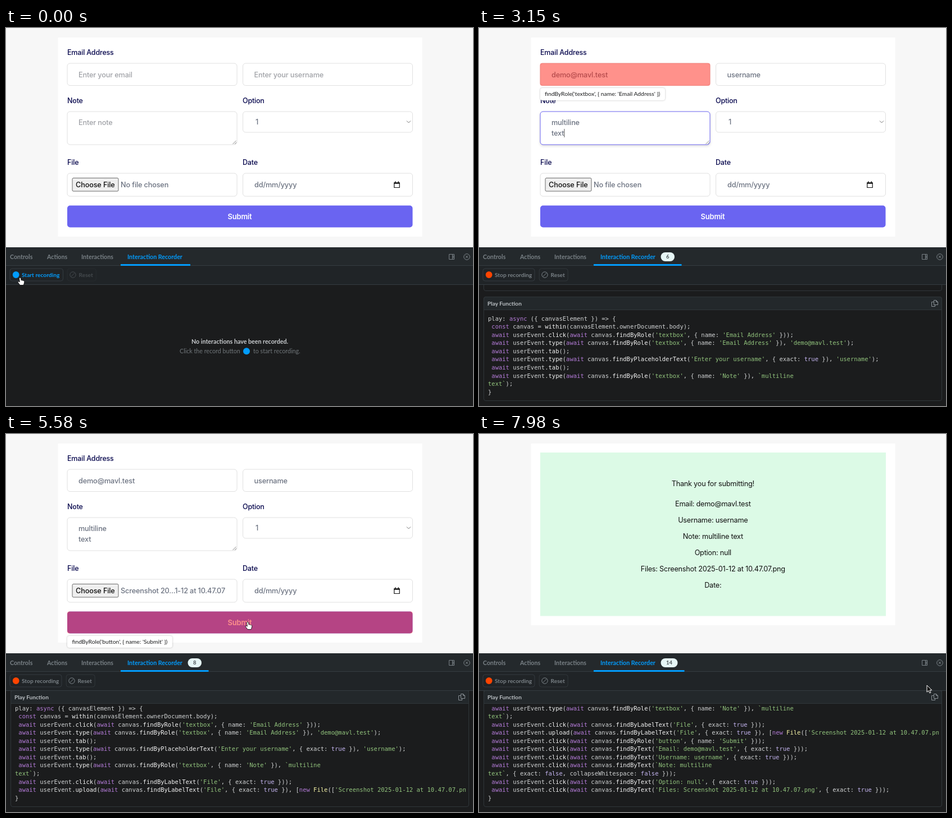
These frames come from a looping animation (831 px wide and 674 px high, 8 s). An HTML page:

```html
<!DOCTYPE html>
<html lang="en">
<head>
<meta charset="utf-8">
<title>Interaction Recorder</title>
<style>
html, body { margin: 0; width: 100%; height: 100%; overflow: hidden; background: #1b1c1d; }
#stage { position: absolute; left: 0; top: 0; width: 831px; height: 674px; overflow: hidden; }
#stage > svg { position: absolute; left: 0; top: 0; }
svg text, #tip { white-space: pre; }
.form { font: 500 12.7px Inter, "Liberation Sans", sans-serif; letter-spacing: -.15px; fill: #6b7280; }
.label { fill: #07074d; font-size: 12.5px; letter-spacing: -.18px; }
.hint { fill: #a0a2a7; }
.field { fill: #fff; stroke: #e0e0e0; }
.focus { stroke: #6a64f1; filter: drop-shadow(0 2px 2px rgba(0,0,0,.14)); }
.thanks { font: 400 12.7px Inter, "Liberation Sans", sans-serif; letter-spacing: -.24px; text-anchor: middle; fill: #111; }
.ui { font: 700 10.7px Lato, "Open Sans", sans-serif; fill: #798186; }
.ui .btn { font-size: 10.2px; }
.mid { text-anchor: middle; }
.thin { font-weight: 400; fill: #70767a; }
.line { fill: none; stroke: #798186; }
#panel { position: absolute; left: 0; top: 458px; width: 831px; height: 216px; overflow: hidden; background: #1b1c1d; }
.box, .head { position: absolute; left: 8px; width: 816px; box-sizing: border-box; border: 1px solid #30363a; border-radius: 4px; }
.head { height: 24px; background: #23282b; font: 700 10.1px/22px Lato, "Open Sans", sans-serif; color: #b9bec2; padding-left: 6px; border-radius: 4px 4px 0 0; }
.head svg { position: absolute; right: 5px; top: 4px; }
pre { position: absolute; left: 16px; width: 802px; margin: 0; overflow: hidden; font: 10.51px/14.55px "DejaVu Sans Mono", "Liberation Mono", monospace; color: #d0d2d3; }
pre .s { color: #92c47d; } pre .k { color: #b47bd8; } pre .b { color: #c6b6f2; } pre .c { color: #f6f3a6; } pre .f { color: #f2f2f2; }
#tip { position: absolute; box-sizing: border-box; height: 21.5px; padding: 0 8.5px; border-radius: 4px; background: #fff; color: #1b1c1d; font: 400 10.3px/21px Lato, "Open Sans", sans-serif; box-shadow: 0 0 3px rgba(0,0,0,.28); }
.dlg { font: 400 11px Inter, "Liberation Sans", sans-serif; fill: #dedede; letter-spacing: -.1px; }
.bold { font-weight: 600; }
.pill { fill: #727272; }
.rule { stroke: #4a4a4a; fill: none; }
</style>
</head>
<body>
<div id="stage">
<svg width="831" height="674" viewBox="0 0 831 674">
  <rect width="831" height="391" fill="#f7f7f7"/>
  <rect id="card" x="92.5" y="17" width="648" height="355" fill="#fff"/>
  <g id="form" class="form">
    <text class="label" x="109" y="47.6">Email Address</text>
    <text class="label" x="109" y="133.5">Note</text>
    <text class="label" x="421" y="133.5">Option</text>
    <text class="label" x="109" y="243.5">File</text>
    <text class="label" x="421" y="243.5">Date</text>
    <rect id="emailBox" class="field" x="109" y="63" width="302" height="39.5" rx="5"/>
    <rect id="userBox" class="field" x="421.5" y="63" width="302" height="39.5" rx="5"/>
    <rect id="noteBox" class="field" x="109" y="149" width="302" height="59" rx="5"/>
    <rect class="field" x="421.5" y="149" width="302" height="37" rx="5"/>
    <rect class="field" x="109" y="259" width="302" height="41" rx="5"/>
    <rect class="field" x="421.5" y="259" width="302" height="41" rx="5"/>
    <text id="email" x="129" y="87.5"></text>
    <text id="user" x="441.5" y="87.5"></text>
    <text id="note" x="129" y="173"></text>
    <text id="note2" x="129" y="192.4"></text>
    <path id="caret" d="M0 0v15" stroke="#555"/>
    <path d="M403.5 207l6-6m-2.500 6l3-3" stroke="#777" stroke-width=".9"/>
    <text x="444" y="172">1</text>
    <path d="M713 165.500l3.500 3.500 3.500-3.500" fill="none" stroke="#777"/>
    <rect x="118" y="267.5" width="82" height="23.500" rx="2" fill="#efefef" stroke="#6a6a6a"/>
    <text x="124" y="284" style="fill:#111">Choose File</text>
    <text id="file" x="204" y="284"></text>
    <text x="442" y="284">dd/mm/yyyy</text>
    <path d="M690.800 275.800h9.400v8.700h-9.400z" fill="none" stroke="#111" stroke-width="1.200"/>
    <path d="M690.500 276.800h10M692.800 273.500v2m5.400-2v2" stroke="#111" stroke-width="1.700"/>
    <rect x="109" y="316.500" width="614.500" height="39" rx="5" fill="#6a64f1"/>
    <text class="mid" x="416" y="340.500" style="fill:#fff;font-weight:600;font-size:12.9px">Submit</text>
  </g>
  <g id="done" class="thanks">
    <rect x="109" y="33" width="615" height="291.500" fill="#dcfae6"/>
    <text x="416.300" y="93">Thank you for submitting!</text>
    <text x="416.300" y="128.700">Email: demo@mavl.test</text>
    <text x="416.300" y="157.800">Username: username</text>
    <text x="416.300" y="187">Note: multiline text</text>
    <text x="416.300" y="216">Option: null</text>
    <text x="416.300" y="245.200">Files: Screenshot 2025-01-12 at 10.47.07.png</text>
    <text x="416.300" y="274.300">Date:</text>
  </g>
  <rect id="glow" rx="4" fill="rgba(255,36,24,.5)"/>

  <g class="ui">
    <rect y="391" width="831" height="283" fill="#1b1c1d"/>
    <rect y="391" width="831" height="33" fill="#24292c"/>
    <rect y="424" width="831" height="33" fill="#202427"/>
    <path d="M0 423.500h831M0 457.500h831" stroke="#353c41"/>
    <text x="7" y="411.700">Controls</text>
    <text x="73" y="411.700">Actions</text>
    <text x="134" y="411.700">Interactions</text>
    <text x="216" y="411.700" fill="#029cfd">Interaction Recorder</text>
    <rect id="under" x="204" y="421" height="3" fill="#029cfd"/>
    <g id="badge">
      <rect id="pill" x="323.500" y="400" height="16" rx="8" fill="#e6f6f6"/>
      <text id="count" class="mid" y="411.300" fill="#4c5458" style="font-size:9.500px"></text>
    </g>
    <path class="line" d="M788.500 403.500h9v9h-9zM794.500 403.500v9M796 405.500v5"/>
    <circle class="line" cx="820" cy="408" r="5.300"/>
    <path class="line" d="M817.800 405.800l4.400 4.400m0-4.400l-4.400 4.400"/>
    <rect id="recBox" x="7" y="429" height="22" rx="4" fill="none"/>
    <circle id="recDot" cx="17.700" cy="440" r="5.900"/>
    <text id="recText" class="btn" x="28" y="443.500"></text>
    <g id="reset">
      <rect x=".5" y="429" width="51" height="22" rx="4" fill="none" stroke="#31373b"/>
      <circle class="line" cx="10.300" cy="440" r="5.200"/>
      <path class="line" d="M6.600 443.700l7.400-7.400"/>
      <text class="btn" x="20.800" y="443.500">Reset</text>
    </g>
    <g id="idle">
      <text class="mid" x="416" y="562.700" fill="#c9cccf">No interactions have been recorded.</text>
      <text class="thin" x="309" y="580">Click the record button</text>
      <circle cx="428" cy="576.300" r="6" fill="#029cfd"/>
      <text class="thin" x="440" y="580">to start recording.</text>
    </g>
    <g id="busy">
      <text class="mid" x="416" y="562.700" fill="#c9cccf">Recording is in progress...</text>
      <text class="thin mid" x="416" y="580">Interact with the story to record events.</text>
    </g>
  </g>
</svg>

<div id="panel">
  <div id="impBox" class="box" style="height:55.4px"><div class="head" style="left:-1px;top:-1px">Imports</div></div>
  <pre id="imp"></pre>
  <div id="playBox" class="box"></div>
  <pre id="code"></pre>
  <div id="playHead" class="head">Play Function
    <svg width="14" height="14" fill="none" stroke="#8a9196"><path d="M5.500 1.500h4l3 3v5h-7zM9.500 1.500v3h3M5.500 4.500h-4v8h6v-3"/></svg>
  </div>
</div>
<div id="tip"></div>

<svg width="831" height="674" viewBox="0 0 831 674">
  <rect id="dim" width="831" height="674" fill="#000"/>
  <g id="dialog" class="dlg">
    <rect x="-40" y="99" width="525" height="379" rx="16" fill="rgba(0,0,0,.16)"/>
    <rect x="-40" y="99.500" width="509.500" height="362.500" rx="9" fill="#2b2b2b" stroke="#555"/>
    <path class="rule" d="M0 150.500h470M0 413.500h470M77.500 150v263M275.500 150v263"/>
    <rect class="pill" x="-10" y="116" width="34" height="16.500" rx="4"/>
    <rect class="pill" x="32" y="116" width="36" height="16.500" rx="4"/>
    <path d="M-3.500 120h10v8h-10zM2.500 120v8M14 123l2.500 2.500 2.500-2.500M57 123l2.500 2.500 2.500-2.500" fill="none" stroke="#ddd"/>
    <path d="M39 121.500h11M39 126.500h11" stroke="#ddd" stroke-width="3" stroke-dasharray="3 1"/>
    <rect class="pill" x="115" y="116" width="167" height="16.500" rx="4"/>
    <path d="M122 120h4l1 1.500h6v7.500h-11z" fill="#4ba9e6"/>
    <text x="137" y="128.300">upload</text>
    <path d="M271.500 122.500l2.500-2.500 2.500 2.500M271.500 126.500l2.500 2.500 2.500-2.500" fill="none" stroke="#ddd"/>
    <rect x="330" y="116" width="124" height="16.500" rx="4" fill="#3c3c3c"/>
    <circle cx="340" cy="124" r="3.600" fill="none" stroke="#ddd"/><path d="M342.600 126.600l3 3" stroke="#ddd"/>
    <text x="351" y="128.300" fill="#999">Search</text>
    <text class="bold" x="107" y="165.500" style="font-size:10px" fill="#b5b5b5">Today</text>
    <rect class="pill" x="-10" y="178" width="79" height="17.500" rx="4"/>
    <path d="M60.500 184l2.500 2.700-2.500 2.700" fill="none" stroke="#bbb"/>
    <rect id="pick" class="pill" x="85.500" y="178" width="181.500" height="17.500" rx="4"/>
    <path d="M91.500 184.500h11v4.500h-11z" fill="#222" stroke="#eee"/>
    <text x="107" y="190.500" style="font-size:10.800px;letter-spacing:-.2px">Screenshot 2...-12 at 10.47.07</text>
    <g id="preview">
      <rect x="284.500" y="223.500" width="176" height="37" rx="4" fill="#1f1f20" stroke="#555"/>
      <g style="font-family:Lato,sans-serif">
        <text class="bold" x="315" y="237.500" style="font-size:7px;font-weight:700;letter-spacing:0">No interactions have been recorded.</text>
        <text x="302" y="248.300" style="font-size:6.800px;letter-spacing:0" fill="#999">Click the record button</text>
        <circle cx="378.500" cy="245.800" r="3.800" fill="#029cfd"/>
        <text x="386" y="248.300" style="font-size:6.800px;letter-spacing:0" fill="#999">to start recording.</text>
      </g>
      <g class="bold">
        <text x="284" y="340.500" style="font-size:11.700px">Screenshot 2025-01-12 at</text>
        <text x="284" y="358" style="font-size:11.700px">10.47.07</text>
        <text x="284" y="394.300">Information</text>
      </g>
      <text x="284" y="375" fill="#bbb">PNG image - 21 KB</text>
      <g text-anchor="end" style="font-size:9.300px">
        <text x="461" y="394" fill="#3f93e0">Show More</text>
        <text x="461" y="411.500">Today, 10:47</text>
        <text x="317.500" y="411.500" fill="#999">Created</text>
      </g>
    </g>
    <rect class="pill" x="331" y="429" width="58" height="17" rx="4"/>
    <rect class="pill" x="395.500" y="429" width="58" height="17" rx="4"/>
    <text class="mid" x="360" y="441.300">Cancel</text>
    <text class="mid" x="424.500" y="441.300">Open</text>
  </g>
  <g id="pointer" stroke-linejoin="round">
    <path id="arrow" d="M0 0v12.200l2.900-2.600 2 4.300 2.100-.9-2-4.200h4z" fill="#111" stroke="#fff"/>
    <path id="beam" d="M-3-7q3 0 3 2v10q0 2 3 2M3-7q-3 0-3 2v10q0 2-3 2M-1.500.500h3" fill="none" stroke="#222" stroke-width="1.200"/>
    <path id="hand" d="M-1.500 0q1.500-2 3 0l.6 4q1.500-1 2.300.3 1.500-.6 2.100.7 1.400-.2 1.300 1.600l-.8 3.600-1 2.300h-6l-4-5.300q0-2 2.300-1l1 .8z" fill="#fff" stroke="#111" stroke-width=".9"/>
  </g>
</svg>
</div>
<script>
const LOOP = 8000, MAIL = 'demo@mavl.test';
const $ = id => document.getElementById(id);
const clamp = v => Math.max(0, Math.min(1, v));
const attr = (id, o) => { for (const k in o) $(id).setAttribute(k, o[k]); };
const show = (id, on) => { $(id).style.display = on ? '' : 'none'; };
const put = (id, s) => { if ($(id).textContent !== s) $(id).textContent = s; };
const typed = (s, from, to, t) => s.slice(0, Math.ceil(clamp((t - from) / (to - from)) * s.length));

const STEPS = [1560, 1710, 1980, 2040, 2400, 2450, 3570, 4650, 5640, 6450, 6660, 6840, 7300, 7800];

// Pointer: time, x, y
const PATH = [
  [0, 25, 446], [570, 25, 446], [1380, 190, 82], [3240, 190, 82], [3500, 160, 281], [3740, 160, 281],
  [4020, 180, 187], [4140, 180, 187], [4400, 403, 442], [4560, 403, 442], [4880, 418, 427], [4920, 418, 427],
  [5500, 430, 336], [5700, 430, 336], [6270, 442, 170], [6400, 440, 124], [6500, 440, 124], [6620, 440, 153],
  [6700, 440, 153], [6800, 440, 182], [6900, 440, 182], [7200, 425, 211], [7350, 425, 211], [7640, 430, 240],
  [7810, 430, 240], [7980, 797, 448]
];

const role = (r, n) => `findByRole('${r}', { name: '${n}' })`;
const exact = (fn, s) => `findBy${fn}('${s}', { exact: true })`;
const FILES = 'Files: Screenshot 2025-01-12 at 10.47.07.png';

// Hover areas: x, y, width, height, query, pointer shape
const FIELDS = [
  [108.5, 62.5, 303, 40.5, role('textbox', 'Email Address'), 'beam'],
  [108.5, 148.5, 303, 60, role('textbox', 'Note'), 'beam'],
  [108.5, 258.5, 303, 42, exact('LabelText', 'File'), 'arrow'],
  [109, 316.5, 614.5, 39, role('button', 'Submit'), 'hand']
];
const RESULTS = [
  [350, 114.5, 132.5, 19, exact('Text', 'Email: ' + MAIL)],
  [353.5, 143.5, 125.5, 19, exact('Text', 'Username: username')],
  [361, 172.5, 110, 19, 'findByText(`Note: multiline text`, { exact: false, collapseWhitespace: false })'],
  [382, 201.5, 68.5, 19, exact('Text', 'Option: null')],
  [283.5, 230.5, 265, 19, exact('Text', FILES)],
  [400, 260, 33, 19, exact('Text', 'Date:')]
];

function pointerAt(t) {
  let i = 1;
  while (i < PATH.length - 1 && PATH[i][0] < t) i++;
  const [t0, x0, y0] = PATH[i - 1], [t1, x1, y1] = PATH[i];
  const p = clamp((t - t0) / (t1 - t0)), e = p * p * (3 - 2 * p);
  return [x0 + (x1 - x0) * e, y0 + (y1 - y0) * e];
}

const paint = src => src.replace(
  /('[^']*'|`[^`]*`)|\b(async|const|await|new)\b|\b(true|false)\b|\b(File)(?=\()|(\w+)(?=\()/g,
  (m, s, k, b, c) => `<span class="${s ? 's' : k ? 'k' : b ? 'b' : c ? 'c' : 'f'}">${m}</span>`);

function codeLines(n, mail, name, note) {
  const click = q => `click(await canvas.${q})`;
  const type = (q, s) => `type(await canvas.${q}, ${s.includes('\n') ? '`' + s + '`' : `'${s}'`})`;
  const calls = [
    click(role('textbox', 'Email Address')),
    type(role('textbox', 'Email Address'), mail),
    'tab()',
    type(exact('PlaceholderText', 'Enter your username'), name),
    'tab()',
    type(role('textbox', 'Note'), note),
    click(exact('LabelText', 'File')),
    `upload(await canvas.${exact('LabelText', 'File')}, [new File(['Screenshot 2025-01-12 at 10.47.07.png'])])`,
    click(role('button', 'Submit')),
    click(exact('Text', 'Email: ' + MAIL)),
    click(exact('Text', 'Username: username')),
    click('findByText(`Note: multiline\ntext`, { exact: false, collapseWhitespace: false })'),
    click(exact('Text', 'Option: null')),
    click(exact('Text', FILES))
  ];
  return ['play: async ({ canvasElement }) => {',
    ' const canvas = within(canvasElement.ownerDocument.body);',
    ...calls.slice(0, n).map(c => ` await userEvent.${c};`), '}'].join('\n');
}

function drawForm(t, mail, name, note) {
  const input = (id, s, hint) => {
    put(id, s || hint);
    $(id).classList.toggle('hint', !s);
  };
  const rows = note.split('\n');
  input('email', mail, 'Enter your email');
  input('user', name, 'Enter your username');
  input('note', rows[0], 'Enter note');
  put('note2', rows[1] || '');
  put('file', t < 4650 ? 'No file chosen' : 'Screenshot 20...1-12 at 10.47.07');

  const focus = t < 1560 ? '' : t < 1980 ? 'email' : t < 2400 ? 'user' : t < 3570 ? 'note' : '';
  for (const id of ['email', 'user', 'note']) $(id + 'Box').classList.toggle('focus', id === focus);
  show('caret', focus);
  if (focus) {
    const id = rows.length > 1 && focus === 'note' ? 'note2' : focus;
    const empty = !{ email: mail, user: name, note }[focus] || (id === 'note2' && !rows[1]);
    const x = +$(id).getAttribute('x') + (empty ? 0 : $(id).getComputedTextLength());
    attr('caret', { transform: `translate(${x + .5} ${$(id).getAttribute('y') - 12.5})` });
  }
}

function drawPanel(t, n, src) {
  const rec = t >= 510, ready = n > 1;
  show('idle', !rec);
  show('busy', rec && !ready);
  show('panel', ready);
  show('badge', n);
  put('count', '' + n);
  attr('pill', { width: n > 9 ? 30 : 24.5 });
  attr('count', { x: n > 9 ? 338.5 : 335.8 });
  attr('under', { width: !n ? 124 : n > 9 ? 161.5 : 156.5 });
  put('recText', rec ? 'Stop recording' : 'Start recording');
  attr('recText', { fill: rec ? '#798186' : '#029cfd' });
  attr('recDot', { fill: rec ? '#ff4400' : '#029cfd' });
  attr('recBox', { width: rec ? 92 : 94.5, stroke: rec && !ready ? '#029cfd' : '#343b40' });
  attr('reset', { transform: `translate(${rec ? 106.7 : 108.7} 0)`, opacity: ready ? 1 : .4 });
  if (!ready) return;

  // Follows the bottom once the code outgrows the panel
  const height = 40.8 + 14.55 * src.split('\n').length;
  const top = Math.min(531, 664.8 - height) - 458;
  if ($('code').dataset.src !== src) {
    $('code').dataset.src = src;
    $('code').innerHTML = paint(src);
  }
  $('impBox').style.top = top - 65.4 + 'px';
  $('imp').style.top = top - 33.2 + 'px';
  $('playBox').style.top = top + 'px';
  $('playBox').style.height = height + 'px';
  $('code').style.top = top + 32.2 + 'px';
  $('playHead').style.top = Math.max(-1, top) + 'px';
}

function drawPointer(t, sent) {
  const [x, y] = pointerAt(t);
  const live = (t > 540 && t < 3720) || t > 4600;
  const pad = sent ? 5 : 0;
  const hit = live && (sent ? RESULTS : FIELDS).find(([l, top, w, h]) =>
    x >= l && x <= l + w && y >= top - pad && y <= top + h + pad);
  show('glow', hit);
  show('tip', hit);
  if (hit) {
    const [l, top, w, h, query] = hit;
    attr('glow', { x: l, y: top, width: w, height: h, rx: sent ? 0 : 4 });
    put('tip', query);
    $('tip').style.left = l + 'px';
    $('tip').style.top = top + h + 4 + 'px';
  }
  const shape = t < 600 ? 'hand' : hit && hit[5] || 'arrow';
  for (const id of ['arrow', 'beam', 'hand']) show(id, id === shape);
  show('pointer', t < 1700 || t > 3240);
  attr('pointer', { transform: `translate(${x} ${y})` });
}

function draw(t) {
  const n = STEPS.filter(s => s <= t).length;
  const mail = typed(MAIL, 1700, 1950, t);
  const name = typed('username', 2030, 2300, t);
  const note = typed('multiline\ntext', 2440, 3000, t);
  const sent = t >= 5640;
  show('form', !sent);
  show('done', sent);
  attr('card', { height: sent ? 324 : 355 });
  drawForm(t, mail, name, note);
  drawPanel(t, n, codeLines(n, mail, name, note));
  drawPointer(t, sent);

  const open = Math.min(clamp((t - 3760) / 150), clamp((4590 - t) / 130));
  attr('dim', { opacity: open * .5 });
  attr('dialog', { opacity: open });
  show('pick', t > 4050);
  show('preview', t > 4100);
}

$('imp').innerHTML = paint("import { userEvent, within } from '@storybook/test';");
const start = performance.now();
function tick() {
  draw((performance.now() - start) % LOOP);
  requestAnimationFrame(tick);
}
tick();
</script>
</body>
</html>
```
